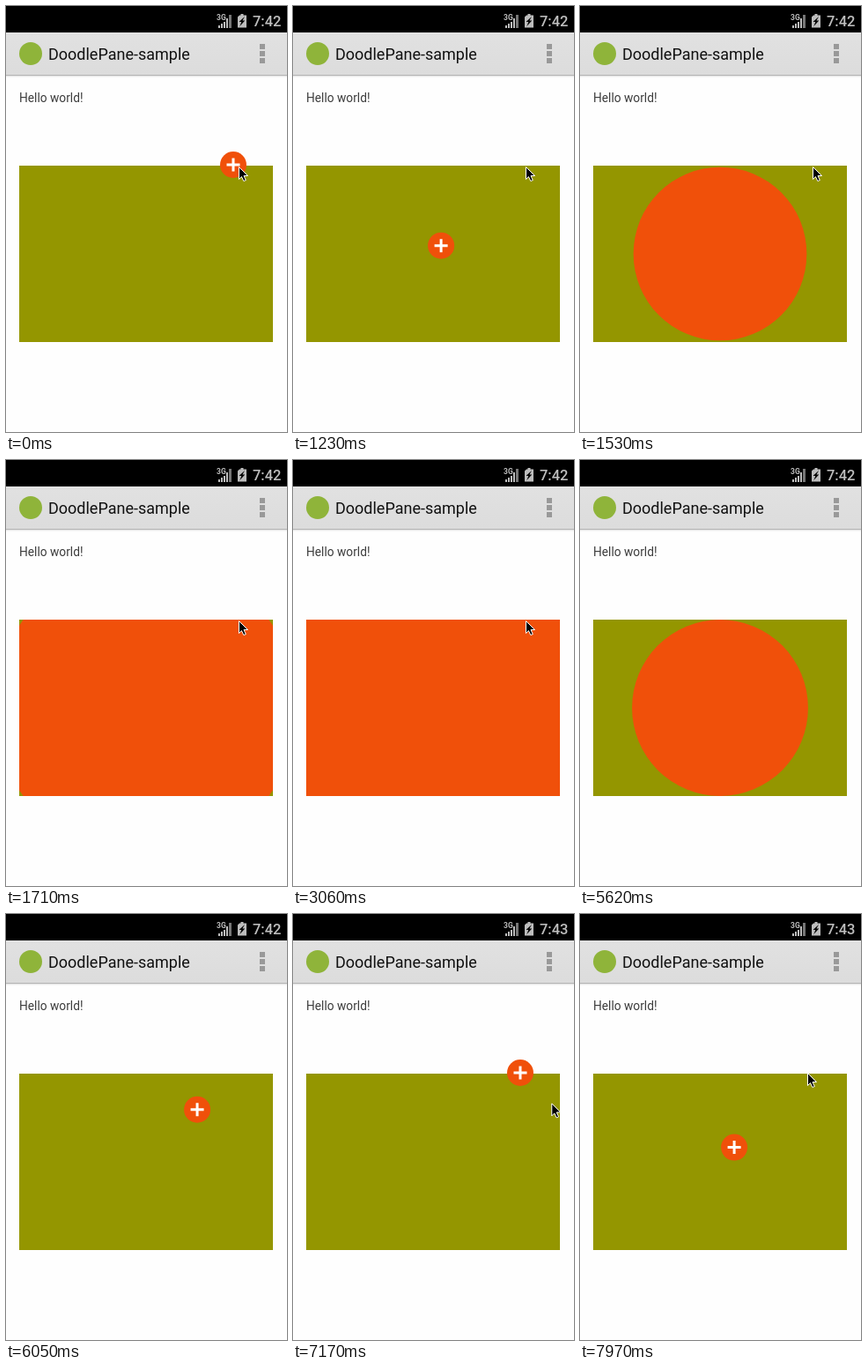
An HTML page that plays this animation: 319 px wide and 483 px high, repeating every 8 s.

```html
<!DOCTYPE html>
<html lang="en">
<head>
<meta charset="utf-8">
<title>Reveal button</title>
<style>
  html, body { margin: 0; width: 100%; height: 100%; overflow: hidden; background: #fefefe; }
  svg { display: block; }
  text { font-family: Roboto, sans-serif; }
</style>
</head>
<body>
<svg width="319" height="483" viewBox="0 0 319 483">
  <defs>
    <linearGradient id="bar" x2="0" y2="1">
      <stop stop-color="#e1e1e1"/><stop offset="1" stop-color="#dcdcdc"/>
    </linearGradient>
    <linearGradient id="shade" x2="0" y2="1">
      <stop stop-color="#dedede"/><stop offset="1" stop-color="#fefefe"/>
    </linearGradient>
    <clipPath id="panel"><rect x="15" y="181" width="288" height="200"/></clipPath>
  </defs>

  <rect width="319" height="483" fill="#fefefe"/>
  <rect width="319" height="30"/>
  <rect y="30" width="319" height="48" fill="url(#bar)"/>
  <rect y="78" width="319" height="1" fill="#b4b4b4"/>
  <rect y="79" width="319" height="2" fill="url(#shade)"/>

  <g fill="#bdbdbd">
    <text x="239" y="16" font-size="8.500" font-weight="700">3G</text>
    <path d="M241 22h2v3h-2zM244 20h2v5h-2zM247 18h2v7h-2zM250 14h2v11h-2z"/>
    <path d="M253 10h3v15h-3z" fill="#777"/>
    <path d="M265 10.500h1.500v-1.500h3v1.500h3.500v14h-10v-12z"/>
    <path d="M271 12l-6.500 6h2.800l-2 5 6-6.500h-2.800z" fill="#000"/>
    <text id="clock" x="312.500" y="23" font-size="16.500" font-weight="500" text-anchor="end">7:42</text>
  </g>

  <circle cx="28" cy="54" r="13" fill="#8fb43a"/>
  <text x="48" y="61" font-size="18" fill="#111">DoodlePane-sample</text>
  <path d="M288 43h6v6h-6zM288 51h6v6h-6zM288 59h6v6h-6z" fill="#999"/>
  <text x="15" y="109" font-size="13.750" fill="#3c3c3c">Hello world!</text>

  <rect x="15" y="181" width="288" height="200" fill="#949600"/>
  <g clip-path="url(#panel)"><circle id="reveal" cx="159" cy="281" fill="#f0500a"/></g>
  <g id="button">
    <circle r="15" fill="#f0500a"/>
    <path d="M-7.500 0h15M0-7.500v15" stroke="#fff" stroke-width="3"/>
  </g>
  <path id="cursor" d="M0 0v14l3-3 2.300 5 2.500-1-2.300-5h4.500z" stroke="#fff"/>
</svg>
<script>
  const LOOP = 8000, SMALL = 15, FULL = 176;
  const HOME = [258, 180], CENTER = [159, 281];
  const $ = id => document.getElementById(id);
  const progress = (t, start, length) => Math.min(1, Math.max(0, (t - start) / length));
  const mix = (a, b, k) => a + (b - a) * k;
  const easeOut = (k, power) => 1 - (1 - k) ** power;
  const smooth = k => k * k * (3 - 2 * k);

  // Cursor stops: time, x, y
  const leaving = [[3060, 264.5, 182.5], [3350, 246, 336], [3860, 297, 89],
                   [3950, 298.5, 87.5], [4070, 298.5, 87.5], [4160, 322, 121]];
  const returning = [[7090, 299, 220], [7450, 258.5, 180.5]];

  function along(stops, t) {
    let i = 0;
    while (i < stops.length - 2 && t >= stops[i + 1][0]) i++;
    const [t0, x0, y0] = stops[i], [t1, x1, y1] = stops[i + 1];
    const k = smooth(progress(t, t0, t1 - t0));
    return [mix(x0, x1, k), mix(y0, y1, k)];
  }

  // travel: 0 at home, 1 at the panel center; radius: size of the reveal
  function pose(t) {
    if (t >= 7792) return { travel: easeOut(progress(t, 7792, 300), 2), radius: SMALL };
    if (t < 5432) return {
      travel: easeOut(progress(t, 1022, 300), 2),
      radius: mix(SMALL, FULL, progress(t, 1326, 396))
    };
    return {
      travel: 1 - easeOut(progress(t, 5832, 468), 1.4),
      radius: mix(FULL, SMALL, progress(t, 5432, 400))
    };
  }

  const place = (id, x, y) => $(id).setAttribute("transform", `translate(${x} ${y})`);
  const show = (id, on) => $(id).setAttribute("visibility", on ? "visible" : "hidden");

  function draw(now) {
    const t = now % LOOP;
    const { travel, radius } = pose(t);
    const open = radius > SMALL;
    show("reveal", open);
    show("button", !open);
    $("reveal").setAttribute("r", radius);
    place("button", mix(HOME[0], CENTER[0], travel), mix(HOME[1], CENTER[1], travel));

    show("cursor", t < 4160 || t >= 7120);
    place("cursor", ...along(t < 5000 ? leaving : returning, t));
    $("clock").textContent = t < 6240 ? "7:42" : "7:43";
    requestAnimationFrame(draw);
  }
  draw(0);
</script>
</body>
</html>
```
